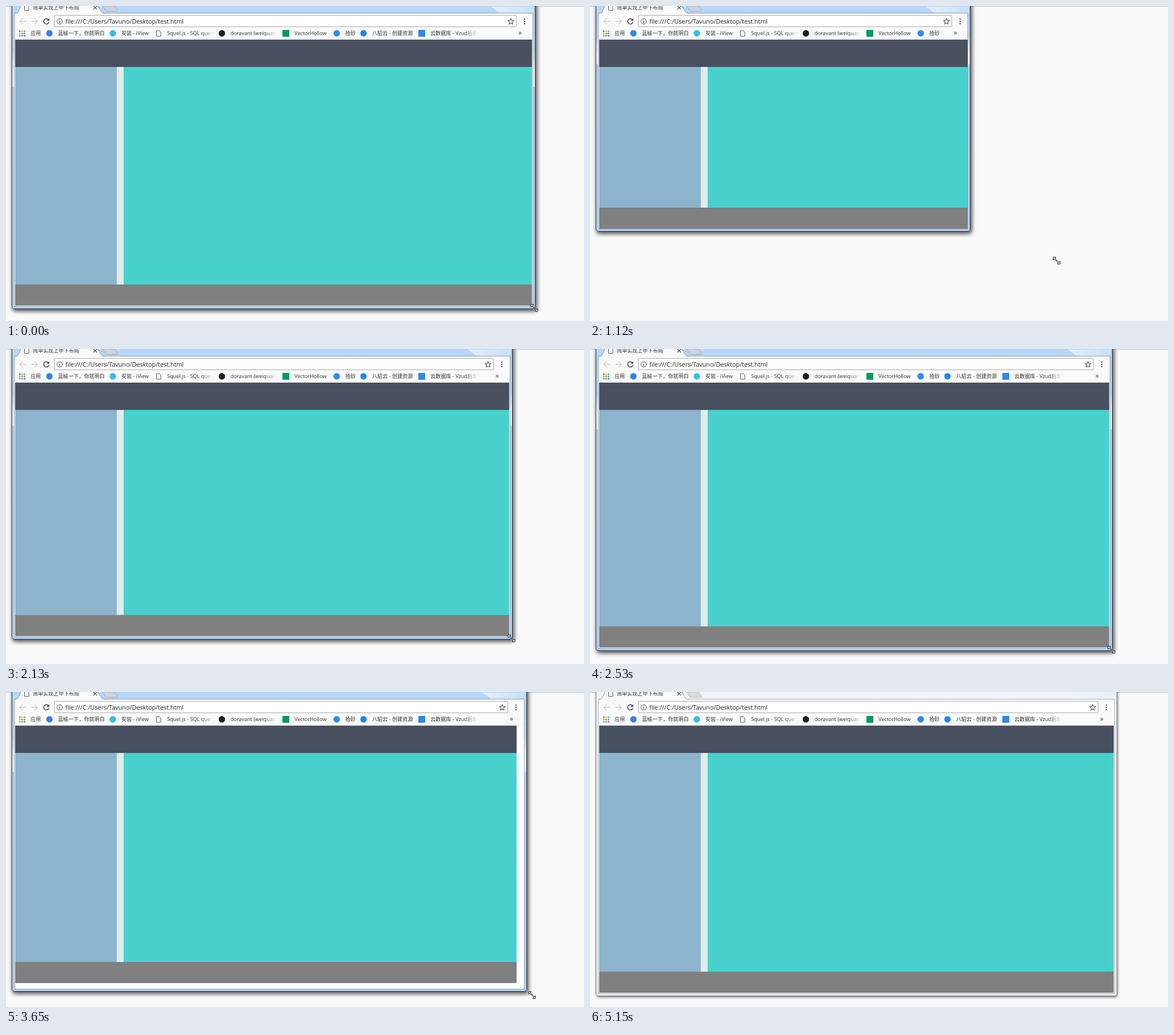
These frames come from a looping animation (1012 px wide and 553 px high, 5300 ms). An HTML page:

```html
<!DOCTYPE html>
<html lang="zh">
<head>
<meta charset="utf-8">
<title>Window resize</title>
<style>
html, body { margin: 0; width: 100%; height: 100%; overflow: hidden; background: #fafafa; }
#stage { position: absolute; left: 0; top: 0; width: 1012px; height: 553px; overflow: hidden; color: #333;
  font: 9.1px/14px "Open Sans", "Noto Sans CJK SC", "Noto Sans CJK", sans-serif; }
#stage div, #stage span, #stage svg { position: absolute; white-space: nowrap; }
#topline { left: 0; top: 0; width: 1012px; height: 1px; background: #b4c2da; }

#win { left: 10px; top: -20px; box-sizing: border-box;
  width: calc(var(--r) - 10px); height: calc(var(--b) + 20px);
  border: 1px solid #2b333d; border-radius: 0 0 5px 5px;
  background: linear-gradient(#b4d6fb 0, #bcdaf9 18%, #f0f6fc 24%, #f6fafd 29.2%, #b7d5f3 29.3%, #b5d6f8 100%);
  box-shadow: 2px 3px 7px 1px rgba(0,0,0,.68); }
#sheen { left: calc(var(--r) - 78px); top: 1px; width: 75px; height: 12px;
  background: linear-gradient(90deg, #e2f0fd, #c6e0fb); clip-path: polygon(0 0, 100% 0, 100% 100%, 22% 100%); }
#client { left: 15px; top: 13px; overflow: hidden; background: #fff;
  width: calc(var(--c) - 15px); height: calc(var(--d) - 13px); }
#rim { left: 14px; top: 12px; box-sizing: border-box; border: 1px solid #8b9eb3;
  width: calc(var(--c) - 13px); height: calc(var(--d) - 11px); }
.idle #win { border-color: #777; background: linear-gradient(#e6f0fa, #f3f6f9 6%, #f1f2f3 30%, #eff1f3);
  box-shadow: 1px 2px 4px rgba(0,0,0,.5); }
.idle #sheen { opacity: .2; }
.idle #rim { border-color: #a9adb3; }

#in { left: -15px; top: -13px; width: 1012px; height: 600px; }
#bar { left: 15px; top: 13px; height: 46px; width: calc(var(--t) - 15px); background: #f9faf9; }
#url { left: 84px; top: 16px; box-sizing: border-box; width: calc(var(--t) - 112px); height: 21px;
  border: 1px solid #aaa; border-radius: 2px; background: #fff; }
#path { left: 104px; top: 19px; font-size: 10.8px; line-height: 15px; color: #222; }
#star { left: calc(var(--t) - 44px); top: 21px; }
#dots { left: calc(var(--t) - 16px); top: 21px; }
#more { left: calc(var(--t) - 25px); top: 40px; font-size: 12px; }
#marks span { left: 15px; top: 41px; max-width: 82px; overflow: hidden; }
#marks .fade { -webkit-mask-image: linear-gradient(90deg, #000 74%, transparent); mask-image: linear-gradient(90deg, #000 74%, transparent); }
#marks svg { left: -6px; top: 42px; }

#page { left: 16px; top: 59px; width: calc(var(--p) - 16px); height: calc(var(--f) - 59px); background: #e0ecea; }
#head { left: 0; top: 0; width: 100%; height: 48px; background: #495060; }
#side { left: 0; top: 48px; bottom: 37px; width: 178px; background: #8db4cd; }
#main { left: 190px; top: 48px; bottom: 37px; right: 0; background: #48d1cc; }
#foot { left: 0; bottom: 0; width: 100%; height: 37px; background: #808080; }
#tab { left: 0; top: 0; }
#plus { fill: #cdd3da; stroke: #93a5b8; }
.idle #plus { fill: #d8d8d8; stroke: #b5b5b5; }
#title { left: 47px; top: -4px; font-size: 9px; }
#sizer, #arrow { left: 0; top: 0; overflow: visible; fill: #fff; stroke: #000; }
</style>
</head>
<body>
<div id="stage">
  <div id="topline"></div>
  <div id="win"></div>
  <div id="sheen"></div>
  <div id="rim"></div>
  <div id="client"><div id="in">
    <div id="bar"></div>
    <div id="url"></div>
    <svg width="100" height="60" fill="none">
      <path d="M35 27H24m5-5l-5 5 5 5M44 27h11m-5-5l5 5-5 5" stroke="#cfcfcf" stroke-width="1.5"/>
      <path d="M74.3 24.2a4.6 4.6 0 1 0 .8 4" stroke="#505050" stroke-width="1.6"/>
      <path d="M75.8 21.5v4.8h-4.8z" fill="#505050"/>
      <circle cx="94" cy="27" r="4.7" stroke="#555"/>
      <path d="M94 26v4M94 23.7v1.2" stroke="#555" stroke-width="1.2"/>
    </svg>
    <span id="path">file:///C:/Users/Tavuno/Desktop/test.html</span>
    <svg id="star" width="12" height="12"><path d="M6 1l1.5 3.3 3.5.4-2.6 2.4.7 3.6L6 8.9l-3.1 1.8.7-3.6L1 4.700l3.500-.4z" fill="none" stroke="#555" stroke-width="1.1"/></svg>
    <svg id="dots" width="4" height="12" fill="#555"><circle cx="2" cy="2" r="1.2"/><circle cx="2" cy="6" r="1.2"/><circle cx="2" cy="10" r="1.2"/></svg>
    <div id="marks"></div>
    <span id="more">»</span>
    <div id="page"><div id="head"></div><div id="side"></div><div id="main"></div><div id="foot"></div></div>
  </div></div>
  <svg id="tab" width="200" height="15">
    <path d="M15 14.500V13.500Q20 13 21.500 10L26 0H161L167 10.500Q169 13 174 13.500V14.500z" fill="#f9faf9"/>
    <path d="M15 13Q20 13 21.500 10L26 0M161 0L167 10.500Q169 13 174 13" fill="none" stroke="#8799ad"/>
    <path id="plus" d="M169 0H190L196 8Q196 9.500 194 9.500H177Q175 9.500 174 8z" stroke-width=".8"/>
    <path d="M32.500-2H37L40 1V7.500H32.500z" fill="#fff" stroke="#555"/>
    <path d="M153 0l6 6m0-6l-6 6" stroke="#555" stroke-width="1.3"/>
  </svg>
  <span id="title">简单实现上中下布局</span>
  <svg id="sizer" width="1" height="1"><path d="M-6-6H-1L-3-4 4 3 6 1V6H1L3 4-4-3-6-1z" stroke-width=".9"/></svg>
  <svg id="arrow" width="1" height="1"><path d="M.5.5V16L4 12.500 6.500 18.500 9 17.500 6.500 11.500H11.500z"/></svg>
</div>
<script>
const $ = id => document.getElementById(id);
const stage = $('stage');
const LOOP = 5300, STEP = 140, FRAME = 5, IDLE = 5150;

// bookmarks: icon centre, shape, colour, text, fades out
const marks = [
  [28, 'grid', '', '应用'],
  [76, 'dot', '#3583e8', '蓝榆一下，你就明白'],
  [187, 'dot', '#35bdea', '安装 - iView'],
  [267, 'file', '', 'Squel.js - SQL query', true],
  [378, 'dot', '#1b1f23', 'doravant (weiquansh', true],
  [490, 'box', '#009a61', 'VectorHollow'],
  [579, 'dot', '#2b8cf0', '拾砂'],
  [626, 'dot', '#1e88f0', '八貂云 - 创建资源'],
  [728, 'box', '#2f8ae8', '云数据库 - Vzud后端', true],
  [840, 'dot', '#8b9d72', 'ZUNOPR -']
];
const icons = {
  dot: color => `<circle cx="6" cy="6" r="5.700" fill="${color}"/>`,
  box: color => `<rect width="12" height="12" fill="${color}"/>`,
  file: () => '<path d="M2.500 1.500h5l2.500 2.500v7h-7.500z" fill="#fff" stroke="#555"/>',
  grid: () => Array.from({ length: 9 }, (_, i) => {
    const col = i % 3, row = Math.floor(i / 3);
    const hue = ['#e8453c', '#f4a62a', '#3cba54', '#4285f4'][(col + row) % 4];
    return `<rect x="${1 + col * 4}" y="${1 + row * 4}" width="2.500" height="2.500" fill="${hue}"/>`;
  }).join('')
};
$('marks').innerHTML = marks.map(([x, kind, color, text, fade]) =>
  `<div style="left:${x}px"><svg width="12" height="12">${icons[kind](color)}</svg>` +
  `<span class="${fade ? 'fade' : ''}">${text}</span></div>`).join('');
const items = [...$('marks').children];
const markEnd = i => i + 1 < marks.length ? marks[i + 1][0] - 15 : marks[i][0] + 65;

// where the drag turns or changes speed: step, right, bottom
const turns = [[0, 927, 532], [1, 927, 532], [5, 766, 461], [7, 667, 397], [8, 666, 396], [9, 800, 440],
  [10, 831, 455], [15, 887, 510], [21, 942, 549], [25, 900, 517], [27, 923, 534]];

function corner(step) {
  const i = turns.findIndex(turn => turn[0] > step);
  if (i < 0) return turns.at(-1).slice(1);
  const [s0, ...from] = turns[i - 1], [s1, ...to] = turns[i];
  const k = (step - s0) / (s1 - s0);
  return from.map((v, axis) => Math.round(v + (to[axis] - v) * k));
}

function place(el, x, y, on) {
  el.style.transform = `translate(${x}px, ${y}px)`;
  el.style.visibility = on ? 'visible' : 'hidden';
}

function draw(now) {
  const t = now % LOOP, n = Math.floor(t / STEP);
  // every third step the page is not repainted yet and the pointer runs ahead
  const late = n % 3 === 2;
  const [r, b] = corner(n);
  const [pageR, pageB] = corner(late ? n - 1 : n);
  const [x, y] = corner(late ? n + 1.6 : n);
  const bar = Math.max(r, pageR) - FRAME;
  const vars = { r, b, c: r - FRAME, d: b - FRAME, t: bar, p: pageR - FRAME - 1, f: pageB - FRAME - 1 };
  for (const name in vars) stage.style.setProperty('--' + name, vars[name] + 'px');
  stage.className = t >= IDLE ? 'idle' : '';
  items.forEach((el, i) => el.style.display = markEnd(i) + 25 < bar ? '' : 'none');
  place($('sizer'), x - 2, y - 2, n < 29);
  place($('arrow'), 942 + 51 * (n - 29), 528, n === 29 || n === 30);
}

function tick() {
  draw(performance.now());
  requestAnimationFrame(tick);
}
tick();
</script>
</body>
</html>
```
